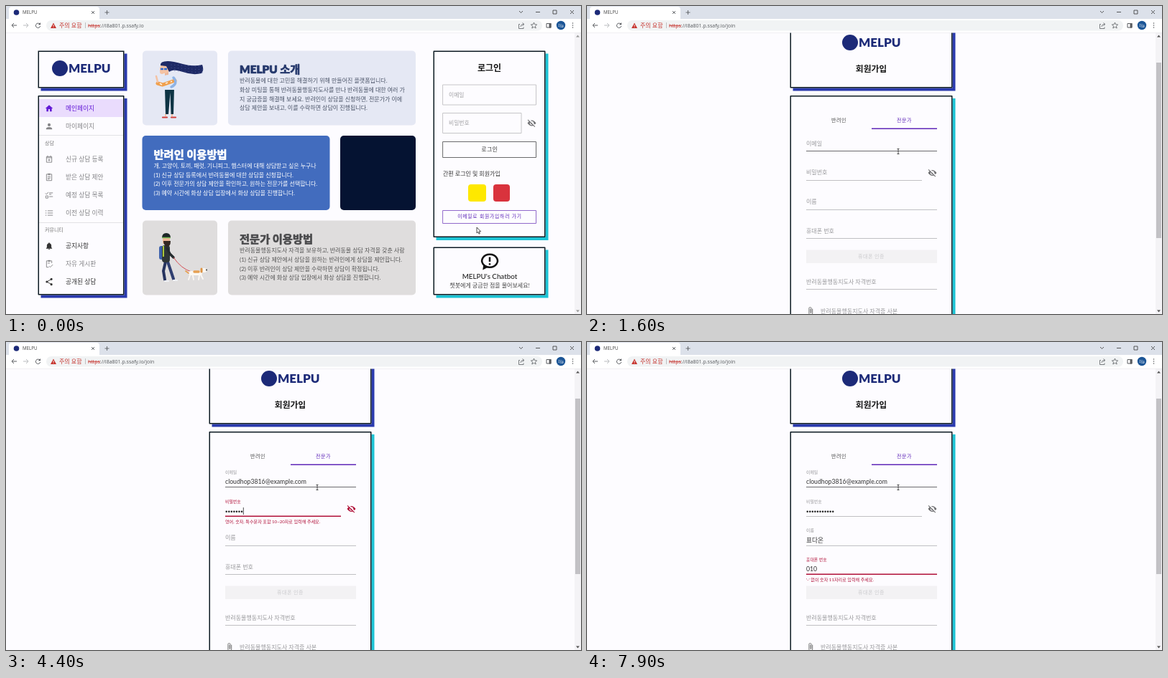
Recreate the animation shown at these times as an HTML page with a canvas. Size 800 px wide and 430 px high, loop 8000 ms.

```html
<!DOCTYPE html>
<html lang="ko">
<head>
<meta charset="utf-8">
<style>
html, body { margin: 0; width: 100%; height: 100%; overflow: hidden; background: #fdfcff; }
canvas { display: block; width: 800px; height: 430px; }
</style>
</head>
<body>
<canvas id="stage" width="800" height="430"></canvas>
<script>
const ctx = document.getElementById('stage').getContext('2d');
const BRAND = 'MELPU', PAGE = '#fdfcff', INK = '#0c1a22', BLUE = '#2a3aae', CYAN = '#1cc3d4';
const PURPLE = '#5e27b8', RED = '#b01038', GRAY = '#858588', NAVY = '#1c2a78';
const KO = 'Lato, "Noto Sans CJK KR", "Noto Sans CJK", sans-serif';
const UI = '"Open Sans", "Noto Sans CJK KR", "Noto Sans CJK", sans-serif';

// ---------- drawing helpers ----------
function rect(x, y, w, h, fill, r = 0) {
  ctx.fillStyle = fill;
  ctx.beginPath();
  ctx.roundRect(x, y, w, h, r);
  ctx.fill();
}
function frame(x, y, w, h, color, lw = 1) {
  ctx.strokeStyle = color;
  ctx.lineWidth = lw;
  ctx.strokeRect(x + lw / 2, y + lw / 2, w - lw, h - lw);
}
function disc(x, y, r, fill) {
  ctx.fillStyle = fill;
  ctx.beginPath();
  ctx.arc(x, y, r, 0, 7);
  ctx.fill();
}
function fillPath(d, color) {
  ctx.fillStyle = color;
  ctx.fill(new Path2D(d));
}
function line(d, color, lw = 1, cap = 'butt') {
  ctx.strokeStyle = color;
  ctx.lineWidth = lw;
  ctx.lineCap = cap;
  ctx.lineJoin = 'round';
  ctx.stroke(new Path2D(d));
}
function text(s, x, cy, size, color, { w = 400, align = 'left', ls = 0, font = KO, heavy = 0 } = {}) {
  ctx.font = `${w} ${size}px ${font}`;
  ctx.letterSpacing = ls + 'px';
  ctx.textAlign = align;
  ctx.fillStyle = ctx.strokeStyle = color;
  ctx.lineWidth = heavy;
  ctx.lineJoin = 'round';
  const base = cy + size * 0.36;
  ctx.fillText(s, x, base);
  if (heavy) ctx.strokeText(s, x, base);
  return ctx.measureText(s).width;
}
const mid = (s, x, y, size, color, o) => text(s, x, y, size, color, { align: 'center', ...o });

function at(x, y, scale, draw) {
  ctx.save();
  ctx.translate(x, y);
  ctx.scale(scale, scale);
  draw();
  ctx.restore();
}
// Icons live on a 24 x 24 grid centred on (x, y): solid part, outlined part.
const ICONS = {
  home: ['M10 20v-6h4v6h5v-8h3L12 3 2 12h3v8z'],
  person: ['M12 12a4 4 0 1 0 0-8 4 4 0 0 0 0 8zM4 20v-2c0-2.7 5.3-4 8-4s8 1.3 8 4v2z'],
  calendar: ['', 'M5 5h14v15H5zM5 8h14M8 2v4M16 2v4M12 11v6M9 14h6'],
  board: ['M9 2h6v4H9z', 'M5 4h14v17H5zM8 10h8M8 14h8M8 17h5'],
  tasks: ['', 'M12 6h10M12 10h6M12 16h10M2 7l3 3 5-6M3 14h6v6H3z'],
  list: ['', 'M8 6h14M8 12h14M8 18h14M2 6h3M2 12h3M2 18h3'],
  bell: ['M12 22a2 2 0 0 0 2-2h-4a2 2 0 0 0 2 2zM18 16v-5c0-3-1.6-5.6-4.5-6.3a1.5 1.7 0 0 0-3 0C7.6 5.4 6 8 6 11v5l-2 2v1h16v-1z'],
  check: ['M9 2h6v4H9z', 'M19 10V4H5v17h6M12 18l3 3 7-7M8 10h6'],
  share: ['M21 5a3 3 0 1 1-6 0 3 3 0 0 1 6 0zM9 12a3 3 0 1 1-6 0 3 3 0 0 1 6 0zM21 19a3 3 0 1 1-6 0 3 3 0 0 1 6 0z', 'M18 5L6 12l12 7'],
  clip: ['', 'M17 6v11.5a4.5 4.5 0 0 1-9 0V5a3 3 0 0 1 6 0v10.5a1.3 1.3 0 0 1-2.6 0V6'],
  chat: ['M4 16L3 23 11 19z', 'M12 3a10 8.300 0 1 0 .1 0zM12 6.500v6M12 14.500v2'],
};
function icon(name, x, y, size, color, lw = 1.8) {
  const [solid, outline] = ICONS[name];
  at(x - size / 2, y - size / 2, size / 24, () => {
    if (solid) fillPath(solid, color);
    if (outline) line(outline, color, lw);
  });
}
function hiddenEye(x, y, color) {
  at(x - 6.5, y - 6.5, 13 / 24, () => {
    fillPath('M1 12Q12-3 23 12Q12 27 1 12z', color);
    disc(12, 12, 5, PAGE);
    disc(12, 12, 3, color);
    line('M4 2L22 20', PAGE, 3);
    line('M2 3.5L20 21.5', color, 2);
  });
}
function card(x, y, w, h, shadow) {
  rect(x + 4, y + 4, w, h, shadow);
  rect(x, y, w, h, PAGE);
  frame(x, y, w, h, INK, 1.5);
}
function logo(x, y) {
  disc(x + 12, y, 11, NAVY);
  text(BRAND, x + 24, y, 17, NAVY, { w: 900 });
}

// ---------- timing helpers ----------
const clamp = v => Math.min(1, Math.max(0, v));
const smooth = v => { v = clamp(v); return v * v * (3 - 2 * v); };
const mix = (a, b, k) => a + (b - a) * k;
const sway = t => (1 - Math.cos(t / 1000 * 2 * Math.PI)) / 2;
function track(t, keys) {
  let i = 0;
  while (i < keys.length - 2 && t >= keys[i + 1][0]) i++;
  const a = keys[i], b = keys[i + 1], k = smooth((t - a[0]) / (b[0] - a[0]));
  return [mix(a[1], b[1], k), mix(a[2], b[2], k)];
}

// ---------- illustrations ----------
function standingWoman(t) {
  const s = sway(t), head = 219 - 4 * s;
  fillPath('M221 114H234L233 151H229.5L228.5 121 226 151H222z', '#0e3444');
  line('M222 151v3M231 151v3', '#f4c3a4', 2);
  line('M218 155.5h6M230 155.5h6', '#d2413c', 2.2, 'round');
  rect(head + 2, 91, 5, 8, '#eab79b');
  fillPath(`M${head} 98Q226 94 233 98L235 117H221z`, '#dfe8f8');
  line(`M${head - 2} 87v5`, '#f4c3a4', 6, 'round');
  rect(head - 4, 80, 11, 14, '#f4c3a4', 4);
  fillPath(`M${head - 4} 83Q${head - 5} 77 ${head + 6} 77Q232 77 246 81
    T273 ${82 + s}Q276 ${89 + s} 272 ${94 + s}Q260 ${97 + s} 246 ${92 + s}T${head + 8} 92L${head + 4} 84z`, '#1e2a66');
  for (let i = 0; i < 30; i++)
    disc(head + 11 + Math.floor(i / 3) * 4.8, 82 + (i % 3) * 4 + i / 10, .5, '#5664a5');
  line(`M${head - 4} 88h4M${head + 1} 88h4`, '#2f6ad0', 2.5);
  line(`M${211 - 3 * s} 108L218 110 235 104`, '#f0a04e', 5, 'round');
  line('M214 108l3 2M222 108l3-1M229 106l2-1', '#fff0dc', 1.6);
  line('M233 100Q240 108 230 113', '#8fb3e4', 3.5, 'round');
  line(`M${209 - 2 * s} 98L${211 - 4 * s} 106`, '#f4c3a4', 2.5, 'round');
}
function sofaScene(t) {
  if (t < 200) return rect(465, 181, 105, 104, '#051332', 5);
  rect(465, 181, 105, 104, '#426cbe', 5);
  fillPath('M474 197L466 214V264H499L487 197z', '#6088d2');
  rect(465, 264, 105, 21, '#3a63b5', 5);
  line('M481 198V266M475 266h12', '#14265a', 1.2);
  fillPath('M475 197H486L491 210H470z', '#86a9e4');
  rect(486, 220, 67, 38, '#1a3478', 8);
  rect(481, 237, 79, 22, '#142a69', 7);
  line('M487 258V266M554 258V266', '#0b1842', 1.5);
  line('M519 222V240', '#102457', 1);
  fillPath('M498 249Q497 239 503 238H510Q516 241 515 249z', '#f4f3f6');
  disc(504, 237, 5.5, '#f4f3f6');
  line('M499 233l-1 5M509 233l1 5', '#d3d5e1', 2, 'round');
  disc(502, 237, .7, '#222');
  disc(505.5, 237, .7, '#222');
  disc(531, 227, 7, '#11183a');
  disc(526, 234, 6, '#11183a');
  disc(538, 234, 6, '#11183a');
  rect(528, 226, 8, 10, '#c9836b', 4);
  fillPath('M525 236H538L541 251H524z', '#d5e0f6');
  line('M526 250L547 246 549 264M527 251L537 253 533 265', '#c9836b', 3.5, 'round');
  line('M526 239Q520 246 530 247M538 239L544 246', '#c9836b', 2.5, 'round');
  line('M531 266h4M548 265h4', '#f2f3f8', 2, 'round');
}
function dogWalker(t) {
  const s = sway(t), back = 221 - 13 * s, front = 233 + 3 * s, x = 222 - 2 * s;
  line(`M${x} 357L${mix(219, 216, s)} 370 ${back} 382`, '#26335e', 4, 'round');
  line(`M${x + 3} 357L${mix(229, 231, s)} 369 ${front} 381`, '#303f70', 4, 'round');
  line(`M${back} 384h5M${front} 383h5`, '#eef0f4', 2.2, 'round');
  rect(x - 9, 335, 8, 19, '#3e62ac', 3);
  rect(x - 5, 334, 11, 24, '#2f3638', 4);
  line(`M${x - 3} 335V350`, '#a9c83c', 2);
  line(`M${x + 2} 338L${x + 6} 346 233 351`, '#242b2e', 3.5, 'round');
  rect(x - 4, 322, 10, 11, '#edb594', 4);
  fillPath(`M${x - 3} 328H${x + 7}Q${x + 7} 336 ${x + 2} 336Q${x - 3} 334 ${x - 3} 328z`, '#332822');
  fillPath(`M${x - 5} 324Q${x - 5} 317 ${x + 1} 317Q${x + 7} 317 ${x + 7} 324z`, '#1c2627');
  line(`M${x - 5} 323.500h12`, '#73b552', 1.5);
  line('M233 351Q244 367 258 371', '#d43d43', .9);
  line('M257 373h13', '#fbf8f3', 6, 'round');
  line('M262 371h6', '#e6a052', 3.5, 'round');
  line(`M256 376l${-2 - s} 6M260 377l${1 + s} 5M269 376l${-1 - s} 6M271 375l${3 + s} 6`, '#fbf8f3', 1.8, 'round');
  line('M254 373L250 370', '#e6a052', 1.8, 'round');
  rect(270, 366, 9, 6, '#fbf8f3', 3);
  line('M272 367v4', '#dc9243', 3, 'round');
  disc(279, 368.5, .9, '#222');
}

// ---------- home page ----------
const MENU = [
  ['home', '메인페이지', 143, '#6218d6'], ['person', '마이페이지', 168, GRAY],
  ['calendar', '신규 상담 등록', 214, GRAY], ['board', '받은 상담 제안', 239, GRAY],
  ['tasks', '예정 상담 목록', 264, GRAY], ['list', '이전 상담 이력', 289, GRAY],
  ['bell', '공지사항', 335, '#333'], ['check', '자유 게시판', 360, GRAY],
  ['share', '공개된 상담', 385, '#333'],
];
function panel(x, y, bg, titleColor, color, title, lines) {
  rect(x, y, 261, 104, bg, 5);
  text(title, x + 16, y + 26, 15.3, titleColor, { w: 900, heavy: .7 });
  lines.forEach((s, i) => text(s, x + 16, y + 42 + i * 12.7, 8, color));
}
function home(t) {
  card(44.5, 62.5, 120, 52, BLUE);
  logo(63, 87);
  card(44.5, 125, 120, 278.5, BLUE);
  rect(46, 130, 117, 25, '#eadcfd');
  for (const [name, label, y, color] of MENU) {
    icon(name, 60, y, 12.5, color);
    text(label, 83, y, 8.7, color);
  }
  rect(46, 180, 117, 1, '#e2e2e5');
  rect(46, 302, 117, 1, '#e2e2e5');
  text('상담', 54, 191, 7, '#777');
  text('커뮤니티', 54, 312, 7, '#777');

  rect(190, 62.5, 104, 104, '#e5e8f4', 5);
  standingWoman(t);
  panel(309, 62.5, '#e5e8f4', '#25386c', '#4b5468', BRAND + ' 소개', [
    '반려동물에 대한 고민을 해결하기 위해 만들어진 플랫폼입니다.',
    '화상 미팅을 통해 반려동물행동지도사를 만나 반려동물에 대한 여러 가',
    '지 궁금증을 해결해 보세요. 반려인이 상담을 신청하면, 전문가가 이에',
    '상담 제안을 보내고, 이를 수락하면 상담이 진행됩니다.']);
  panel(189.5, 181, '#426cbe', '#fff', '#fff', '반려인 이용방법', [
    '개, 고양이, 토끼, 패럿, 기니피그, 햄스터에 대해 상담받고 싶은 누구나',
    '(1) 신규 상담 등록에서 반려동물에 대한 상담을 신청합니다.',
    '(2) 이후 전문가의 상담 제안을 확인하고, 원하는 전문가를 선택합니다.',
    '(3) 예약 시간에 화상 상담 입장에서 화상 상담을 진행합니다.']);
  sofaScene(t);
  rect(190, 299.5, 104, 104, '#dfdddd', 5);
  dogWalker(t);
  panel(309, 299.5, '#dfdddd', '#4a4a4c', '#555', '전문가 이용방법', [
    '반려동물행동지도사 자격을 보유하고, 반려동물 상담 자격을 갖춘 사람',
    '(1) 신규 상담 제안에서 상담을 원하는 반려인에게 상담을 제안합니다.',
    '(2) 이후 반려인이 상담 제안을 수락하면 상담이 확정됩니다.',
    '(3) 예약 시간에 화상 상담 입장에서 화상 상담을 진행합니다.']);

  card(594.5, 62.5, 156, 260.5, CYAN);
  mid('로그인', 672.5, 87, 12, '#161616', { w: 700 });
  frame(607.5, 109.5, 130.5, 29, '#c6c6c8');
  text('이메일', 616, 124, 7.8, '#a0a0a3');
  frame(607.5, 149, 110, 29, '#c6c6c8');
  text('비밀번호', 616, 163.5, 7.8, '#a0a0a3');
  hiddenEye(731.5, 163.5, '#6f6f72');
  frame(607.5, 189, 130.5, 23, '#6a6a6c');
  mid('로그인', 673, 200, 7.6, '#333', { ls: .7 });
  text('간편 로그인 및 회원가입', 608, 234, 8, '#333');
  rect(643, 249, 25, 24, '#fee800', 4);
  rect(678, 249, 23, 24, '#d9333d', 4);
  if (t >= 200) rect(608, 285, 130, 18, '#f5effc');
  if (t >= 400) {
    const r = 60 * smooth((t - 300) / 200);
    const left = Math.max(612, 658 - r), right = Math.min(730, 658 + r);
    rect(left, 286, right - left, 16, '#e9def8');
  }
  frame(607.5, 285, 130.5, 19, '#9169cb');
  mid('이메일로 회원가입하러 가기', 673, 294, 6.8, PURPLE, { ls: .8 });

  card(594.5, 336.5, 156, 67, CYAN);
  icon('chat', 673, 356.5, 26, '#111', 2.3);
  mid(BRAND + "'s Chatbot", 673, 377, 9.8, '#222', { w: 500 });
  mid('챗봇에게 궁금한 점을 물어보세요!', 673, 390.5, 8, '#444');
}

// ---------- sign-up page ----------
// Each field: typed states appear one per `step`, beginning at `start`.
const prefixes = s => [...s].map((_, i) => s.slice(0, i + 1));
const FIELDS = [
  { label: '이메일', focus: 1700, start: 1875, step: 75, states: prefixes('cloudhop3816@example.com'),
    ok: v => /@.+\..{2}/.test(v), error: '이메일 형식으로 입력해 주세요.' },
  { label: '비밀번호', focus: 3700, start: 3840, step: 90, states: prefixes('•'.repeat(11)), secret: true,
    ok: v => v.length >= 10, error: '영어, 숫자, 특수문자 포함 10~20자로 입력해 주세요.' },
  { label: '이름', focus: 5300, start: 6000, step: 100, states: ['ㅍ', '표', '표ㄷ', '표다', '표당', '표다오', '표다온'],
    ok: v => v.length >= 2, error: '이름을 2자 이상 입력해 주세요.' },
  { label: '휴대폰 번호', focus: 6700, start: 7000, step: 200, states: prefixes('010'),
    ok: () => false, error: "'-' 없이 숫자 11자리로 입력해 주세요." },
];
function field(i, t, top) {
  const f = FIELDS[i], y = top + 254.4 + i * 40.6, width = f.secret ? 161 : 182;
  const blur = i < 3 ? FIELDS[i + 1].focus : Infinity;
  const active = t >= f.focus && t < blur;
  const count = Math.min(f.states.length, Math.max(0, Math.floor((t - f.start) / f.step) + 1));
  const value = count ? f.states[count - 1] : '';
  const bad = count > 0 && !f.ok(value);
  const k = smooth((t - f.focus) / 200);
  const tint = bad ? RED : active ? PURPLE : '#98989b';

  text(f.label, 305, y - mix(10.4, 20.4, k), mix(8, 5.9, k), tint);
  rect(305, Math.round(y), width, 1, i === 0 && t >= 1600 ? '#6b6b6e' : '#c0c0c3');
  if (active || bad) rect(305 + width * (1 - k) / 2, Math.round(y) - .5, width * k, 1.5, tint);
  if (bad) text(f.error, 305, y + 7.6, 6.1, RED);

  let end = 305;
  if (f.secret) {
    for (let n = 0; n < value.length; n++) disc(306.7 + n * 3.55, y - 6.3, 1.25, '#222');
    end += value.length * 3.55;
    hiddenEye(480.5, y - 10, bad ? RED : '#6f6f72');
  } else if (value) end += text(value, 305, y - 7.2, 8.7, '#333');

  const lastKey = count ? f.start + (count - 1) * f.step : f.focus;
  if (active && (t - lastKey) % 1000 < 500) rect(end, y - 12, .8, 10, '#222');
}
function join(t, top) {
  const expert = t >= 1100;
  card(282.5, top + 62.5, 226, 104, BLUE);
  logo(354, top + 103);
  mid('회원가입', 395.5, top + 140, 11.8, '#161616', { w: 700 });
  card(282.5, top + 177, 226, 400, CYAN);

  if (t >= 1000 && t < 1400) rect(396, top + 199, 91, 24, '#f4f1f8');
  mid('반려인', 350.5, top + 211.5, 7, expert ? '#444' : PURPLE, { ls: .5 });
  mid('전문가', 441.5, top + 211.5, 7, expert ? PURPLE : '#444', { ls: .5 });
  rect(mix(305, 396, smooth((t - 1000) / 200)), top + 222.5, 91, 1.5, PURPLE);

  FIELDS.forEach((_, i) => field(i, t, top));
  rect(305, top + 392.5, 182, 18.5, '#f3f2f4');
  mid('휴대폰 인증', 395.5, top + 401.5, 7, '#c9c9cc', { ls: .5 });
  if (expert) {
    text('반려동물행동지도사 자격번호', 305, top + 437, 8, '#98989b');
    rect(305, top + 447, 182, 1, '#c0c0c3');
    icon('clip', 311, top + 478, 13, '#777');
    text('반려동물행동지도사 자격증 사본', 325, top + 478, 8, '#98989b');
  }
}

// ---------- browser ----------
function browser(t) {
  const dark = '#5a5d61';
  rect(0, 0, 800, 18, '#dce1ea');
  rect(4, 1, 126, 20, '#fff', 4);
  rect(0, 18, 800, 19, '#fff');
  rect(0, 37, 800, .6, '#e3e4e7');
  disc(14.5, 9, 3.8, NAVY);
  text(BRAND, 23, 8.8, 6.2, '#444', { font: UI });
  line('M119 7l4 4M123 7l-4 4M137.5 9h6M140.5 6v6', dark, .9);
  line('M714 7l2.5 2.5L719 7M737 8.5h6M761 6h5v5h-5zM785 6l5 5M790 6l-5 5', '#333', .8);

  line('M15 27H8.5M11 24l-3 3 3 3', dark, 1);
  line('M24 27h6.5M28 24l3 3-3 3', '#b9bbbe', 1);
  if (t >= 500 && t < 700) line('M42 24.5l5 5M47 24.5l-5 5', dark, 1);
  else {
    line('M47 25.2A3.2 3.2 0 1 0 47.7 28', dark, 1);
    fillPath('M48 23V26.2H44.8z', dark);
  }
  rect(56, 20, 690, 14.5, '#f1f3f4', 7);
  fillPath('M66 23.5L70 31H62z', '#c5312b');
  rect(65.6, 26, .9, 2.5, '#fff');
  rect(65.6, 29.2, .9, .9, '#fff');
  text('주의 요함', 74, 27, 8, '#c5312b', { font: UI });
  rect(110, 23, .7, 8, '#aaa');
  const scheme = text('https', 114, 27.2, 7, '#c5312b', { font: UI });
  rect(114, 27.4, scheme, .7, '#c5312b');
  text('://i8a801.p.ssafy.io' + (t >= 500 ? '/join' : ''), 114 + scheme, 27.2, 7, '#55585c', { font: UI });
  line('M715 25.5h-1.5v6h6.5v-2M716 29q0-3.5 4-3.5M718.5 23.5l2.5 2-2.5 2', dark, .8);
  line('M734.5 23l1.2 2.8 3 .2-2.3 2 .8 3-2.7-1.7-2.7 1.7.8-3-2.3-2 3-.2z', dark, .8);
  frame(751.5, 24, 7, 6.5, dark);
  rect(755.5, 24, 3, 6.5, dark);
  disc(772, 27, 6.2, '#1b5596');
  mid('하늘', 772, 27, 4.4, '#fff');
  for (const y of [24, 27, 30]) disc(788.5, y, .8, dark);
}
function scrollbar(t, scroll) {
  rect(791, 37, 9, 393, '#f4f3f6');
  fillPath('M793 43.5h5l-2.5-3zM793 424.5h5l-2.5 3z', t < 700 ? '#999' : '#555');
  if (t >= 700) rect(792, 46 + scroll * 33 / 52, 7, 245, '#c2c1c5');
}
const ARROW = 'M0 0V8L1.8 6.4 3 9.2 4.3 8.6 3.1 5.9H5.6z';
const HAND = 'M-.8 0Q.3-1 1.2 0V4L5 5Q5.5 8 4 10H-.5L-3.3 6.5Q-3 5-.8 6z';
const BEAM = 'M-1.5-3.5h3M0-3.5v7M-1.5 3.5h3';
function pointer(t) {
  const [x, y] = track(t, [[0, 655, 309], [200, 657, 294], [700, 657, 294], [1100, 437, 212],
    [1300, 437, 212], [1600, 433, 203], [8000, 433, 203]]);
  const overLink = (t >= 200 && t < 800) || (t >= 1000 && t < 1500);
  const shape = t >= 1600 ? BEAM : overLink ? HAND : ARROW;
  at(x, y, 1, () => {
    fillPath(shape, '#fff');
    line(shape, '#222', .8);
  });
}

function render(t) {
  const scroll = 52 * smooth((t - 1300) / 300);
  rect(0, 0, 800, 430, PAGE);
  if (t < 700) home(t);
  else join(t, -scroll);
  scrollbar(t, scroll);
  browser(t);
  pointer(t);
}

let shown = -1;
function tick() {
  const t = Math.floor(performance.now() % 8000 / 100) * 100;
  if (t !== shown) render(shown = t);
  requestAnimationFrame(tick);
}
tick();
</script>
</body>
</html>
```
